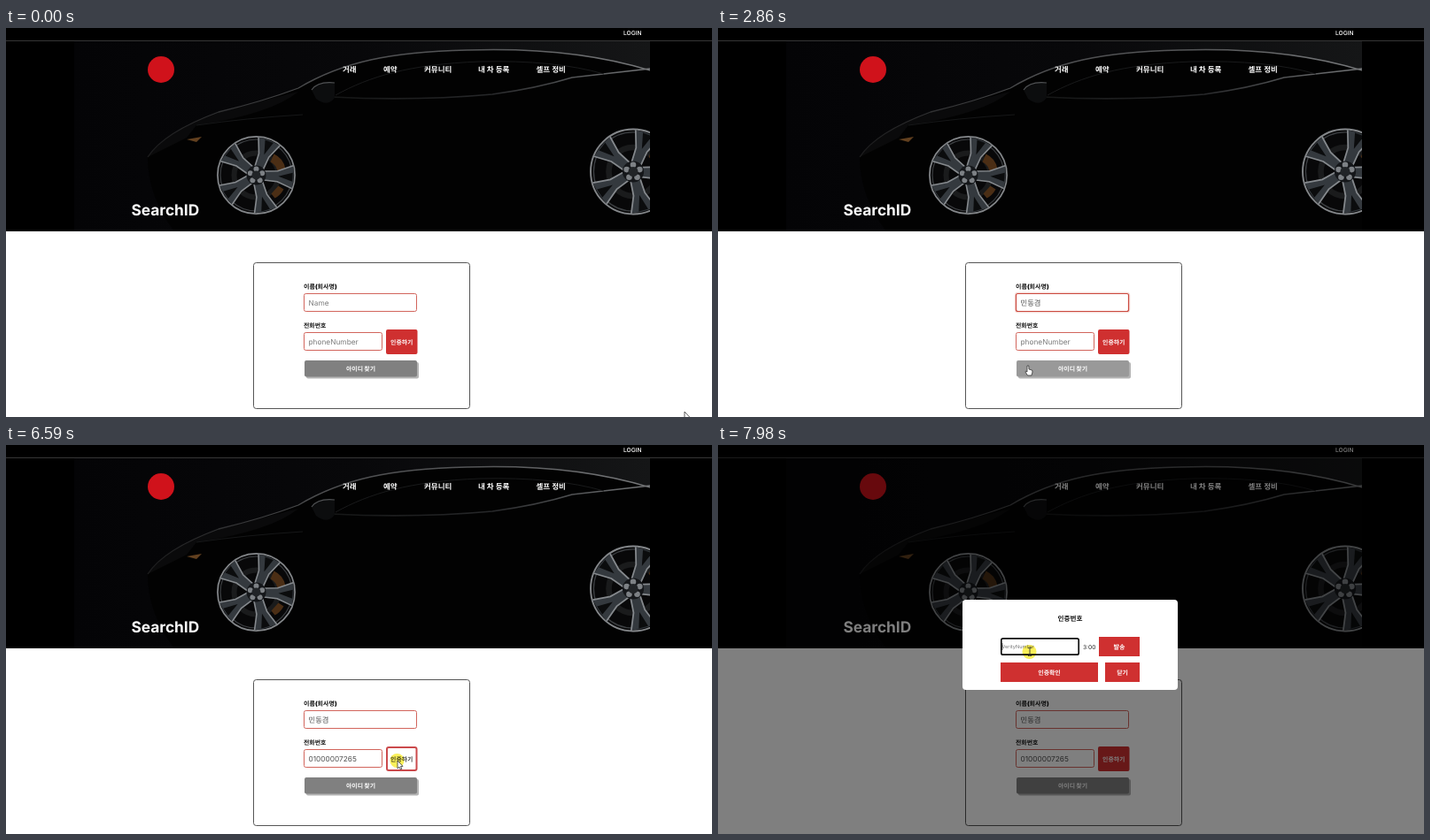
An HTML page with a canvas for the animation above (8000 ms loop, 797 by 440 pixels).

```html
<!DOCTYPE html>
<html lang="ko">
<head>
<meta charset="utf-8">
<title>SearchID</title>
<style>
html, body { margin: 0; width: 100%; height: 100%; overflow: hidden; background: #fff; }
canvas { display: block; }
</style>
</head>
<body>
<canvas id="stage" width="797" height="440"></canvas>
<script>
const ctx = document.getElementById('stage').getContext('2d');
const LOOP = 8000;
const FONT = 'Inter, "Noto Sans CJK KR", "Noto Sans CJK JP", "Noto Sans CJK", sans-serif';
const RED = '#cf3030';
const TAU = Math.PI * 2;
const BLINK = 530;

const box = {
  name: [336, 300, 128, 21],
  phone: [336, 344, 89, 21],
  verify: [429, 341, 35.5, 28],
  find: [337, 376, 127, 18.5],
  code: [319, 218, 89, 20],
  send: [430, 217, 46, 22],
  confirm: [319, 246, 110, 22],
  close: [437, 246, 39, 22]
};

// [time, x, y]
const path = [
  [0, 766, 434], [70, 766, 434], [560, 409, 313], [2460, 409, 313],
  [2660, 249, 430], [2850, 350, 382], [2920, 350, 382], [3130, 377, 354],
  [5850, 377, 354], [6350, 442, 357], [6850, 442, 357], [7220, 455, 227],
  [7390, 455, 227], [7580, 439, 245], [7850, 352, 234], [LOOP, 352, 234]
];

// [time, text]
const nameKeys = [
  [790, 'ㅁ'], [860, '미'], [1460, '민'], [1540, '민ㄷ'], [1640, '민도'],
  [1790, '민동'], [1930, '민동ㄱ'], [2000, '민동겨'], [2060, '민동겸']
];
const PHONE = '01000007265';
const phoneKeys = [3850, 3990, 4050, 4250, 4320, 4460, 4580, 4850, 4940, 5030, 5120]
  .map((t, i) => [t, PHONE.slice(0, i + 1)]);

const focusTimes = { name: [630, 3190], phone: [3190, 6520], code: [7920, LOOP] };
const MODAL_AT = 6650;
const clicks = [[6520, 6650], [7890, LOOP]];

const smooth = p => p * p * (3 - 2 * p);
const during = (t, [a, b]) => t >= a && t < b;
const inside = (p, [x, y, w, h]) => p.x >= x && p.x <= x + w && p.y >= y && p.y <= y + h;
const lastKey = (keys, t) => keys.filter(k => k[0] <= t).pop();

function pointerAt(t) {
  const i = Math.max(1, path.findIndex(k => k[0] > t));
  const [t0, x0, y0] = path[i - 1], [t1, x1, y1] = path[i];
  const p = smooth((t - t0) / (t1 - t0));
  return { x: x0 + (x1 - x0) * p, y: y0 + (y1 - y0) * p };
}

function text(str, x, y, size, color, weight = 400, align = 'left') {
  ctx.font = `${weight} ${size}px ${FONT}`;
  ctx.textAlign = align;
  ctx.fillStyle = color;
  ctx.fillText(str, x, y);
}

function rect([x, y, w, h], r, fill, stroke, line = 1) {
  ctx.beginPath();
  ctx.roundRect(x, y, w, h, r);
  if (fill) { ctx.fillStyle = fill; ctx.fill(); }
  if (stroke) { ctx.strokeStyle = stroke; ctx.lineWidth = line; ctx.stroke(); }
}

const inset = ([x, y, w, h], d) => [x + d, y + d, w - 2 * d, h - 2 * d];

function disc(x, y, r, fill) {
  ctx.beginPath();
  ctx.arc(x, y, r, 0, TAU);
  ctx.fillStyle = fill;
  ctx.fill();
}

function ring(x, y, r, color, width) {
  ctx.beginPath();
  ctx.arc(x, y, r, 0, TAU);
  ctx.strokeStyle = color;
  ctx.lineWidth = width;
  ctx.stroke();
}

function poly(points, fill, stroke, width = 1) {
  ctx.beginPath();
  points.forEach(([x, y]) => ctx.lineTo(x, y));
  ctx.closePath();
  if (fill) { ctx.fillStyle = fill; ctx.fill(); }
  if (stroke) { ctx.strokeStyle = stroke; ctx.lineWidth = width; ctx.stroke(); }
}

function line(d, color, width) {
  ctx.strokeStyle = color;
  ctx.lineWidth = width;
  ctx.stroke(new Path2D(d));
}

function shape(d, fill) {
  ctx.fillStyle = fill;
  ctx.fill(new Path2D(d));
}

function ramp(x0, y0, x1, y1, ...colors) {
  const g = ctx.createLinearGradient(x0, y0, x1, y1);
  colors.forEach((c, i) => g.addColorStop(i / (colors.length - 1), c));
  return g;
}

function wheel(x, y, r) {
  ctx.save();
  ctx.translate(x, y);
  ctx.scale(r / 45, r / 45);
  disc(0, 0, 45, '#080809');
  ring(0, 0, 43.6, '#84878a', 1.7);
  ring(0, 0, 40.5, '#3c3f42', 1.2);
  ring(0, 0, 25, '#1a1b1c', 6);
  shape('M20 -24 Q31 -19 33 -7 L24 -5 Q22 -12 16 -15Z M25 12 L31 16 Q27 23 21 26 L17 21Z', '#4b2e15');
  for (let i = 0; i < 5; i++) {
    ctx.save();
    ctx.rotate((-141 + 72 * i) * Math.PI / 180);
    poly([[9, -5], [24, -6], [41, -13], [42, -4], [42, 4], [41, 13], [24, 6], [9, 5]], '#34393e');
    line('M9 -5 L24 -6 L41 -13 M9 5 L24 6 L41 13', '#85898d', 1.6);
    poly([[25, 0], [41, -5], [41, 5]], '#0b0c0d');
    ctx.restore();
  }
  disc(0, 0, 11, '#15171a');
  for (let i = 0; i < 5; i++) {
    const a = i / 5 * TAU - Math.PI / 2;
    disc(7 * Math.cos(a), 7 * Math.sin(a), 3, '#7d8185');
  }
  disc(0, 0, 5, '#212427');
  ctx.restore();
}

function car() {
  const roof = 'M160 146 Q178 118 240 95 Q290 83 330 68 C380 38 435 27 520 25 Q640 21 727 48';
  ctx.save();
  ctx.beginPath();
  ctx.rect(77, 15, 650, 215);
  ctx.clip();
  ctx.fillStyle = ramp(77, 0, 727, 0, '#040406', '#08080a', '#151617');
  ctx.fillRect(77, 15, 650, 215);
  shape(roof + ' V230 H190 Q160 190 160 146Z', '#020202');
  shape('M160 146 Q178 118 240 95 L330 72 Q300 97 215 110 L204 124Z', '#0a0a0b');
  line(roof, ramp(160, 0, 727, 0, '#1c1c1d', '#4c4d4f', '#555658', '#77797b'), 1.3);
  line('M368 78 Q460 83 549 75 Q600 68 639 56 L727 46', ramp(368, 0, 727, 0, '#151616', '#27282a', '#77797b'), 1.6);
  line('M372 76 C410 55 455 41 535 38 Q620 36 675 52', '#191a1b', 1);
  line('M215 110 Q270 102 335 98', '#161718', 1);
  shape('M345 70 Q352 60 371 62 L371 79 Q363 90 350 80Z', '#0c0d0e');
  line('M345 70 Q352 60 371 62', '#515355', 1.2);
  shape('M204 126 L221 123 L215 129Z', '#62401f');
  wheel(282.5, 166.5, 45);
  wheel(708, 162.5, 49.5);
  ctx.restore();
}

function header() {
  ctx.fillStyle = '#000';
  ctx.fillRect(0, 0, 797, 230);
  car();
  ctx.fillStyle = '#353535';
  ctx.fillRect(0, 14, 797, 1);
  text('LOGIN', 697, 8, 6.7, '#fff', 500);
  disc(175, 47, 15, '#d0121b');
  [['거래', 380], ['예약', 426], ['커뮤니티', 472], ['내 차 등록', 533], ['셀프 정비', 598.5]]
    .forEach(([label, x]) => text(label, x, 50, 8.5, '#fff', 700));
  text('SearchID', 141.5, 212, 17.3, '#fff', 700);
}

function field(b, focused) {
  if (focused) rect(inset(b, -0.3), 3, null, '#f5d9d5', 2);
  rect(inset(b, 0.5), 2, '#fff', focused ? '#cb4a40' : '#d2655c', focused ? 1.2 : 1);
}

function caret(x, y, h, t, since) {
  if (Math.floor((t - since) / BLINK) % 2) return;
  ctx.fillStyle = '#222';
  ctx.fillRect(x, y, 0.8, h);
}

function input(id, keys, hint, y, t) {
  const focused = during(t, focusTimes[id]);
  const key = lastKey(keys, t);
  field(box[id], focused);
  text(key ? key[1] : hint, 341.5, y, 8.3, key ? '#505050' : '#7c7c7c');
  if (!focused) return;
  const x = key ? 341.5 + ctx.measureText(key[1]).width : 341.2;
  caret(x, y - 8, 10, t, Math.max(focusTimes[id][0], key ? key[0] : 0));
}

function button(b, label, size, hover, r = 0) {
  if (hover) rect(inset(b, 1), r, '#fff', '#cb4a4c', 2);
  else rect(b, r, RED);
  text(label, b[0] + b[2] / 2, b[1] + b[3] / 2 + 2.5, size, hover ? '#444' : '#fff', 900, 'center');
}

function form(t, pointer) {
  const open = t >= MODAL_AT;
  rect([279.5, 265.5, 244, 165], 3, '#fff', '#555');
  text('이름(회사명)', 336, 295.3, 7, '#111', 900);
  input('name', nameKeys, 'Name', 313.7, t);
  text('전화번호', 336, 339.3, 6.9, '#111', 900);
  input('phone', phoneKeys, 'phoneNumber', 357.7, t);
  button(box.verify, '인증하기', 6.9, !open && inside(pointer, box.verify), 2);
  const [x, y, w, h] = box.find;
  rect([x + 2, y + 2, w, h], 2, '#b4b4b4');
  rect(box.find, 2, !open && inside(pointer, box.find) ? '#999' : '#808080');
  text('아이디 찾기', 400.5, 387.8, 6.9, '#fff', 900, 'center');
}

function modal(t, pointer) {
  ctx.fillStyle = 'rgba(0,0,0,.5)';
  ctx.fillRect(0, 0, 797, 440);
  rect([276, 175, 243, 102], 4, '#fff');
  text('인증번호', 397.5, 199, 7.6, '#111', 700, 'center');
  const focused = during(t, focusTimes.code);
  if (focused) rect(inset(box.code, 0.8), 2, '#fff', '#111', 1.7);
  else rect(inset(box.code, 0.5), 0, '#fff', '#ead3d6');
  text('VerityNumber', 320.5, 230, 5.6, '#757575');
  if (focused) caret(320.5, 224, 8, t, focusTimes.code[0]);
  text('3:00', 412, 230.8, 6.6, '#222');
  button(box.send, '발송', 7, inside(pointer, box.send));
  button(box.confirm, '인증확인', 6.9, false);
  button(box.close, '닫기', 6.9, false);
}

const arrow = [[0, 0], [0, 9], [2, 7.2], [3.4, 10], [4.8, 9.3], [3.5, 6.6], [6, 6.4]];
const hand = [[-1, 0], [0.8, 0], [1, 4], [4.6, 5], [5, 7], [4, 11], [-0.5, 11], [-3, 7], [-2.4, 6], [-1, 7]];

function cursor(t, pointer) {
  const open = t >= MODAL_AT;
  ctx.save();
  ctx.translate(pointer.x, pointer.y);
  if (clicks.some(c => during(t, c))) {
    ctx.globalCompositeOperation = 'multiply';
    disc(-0.5, 0, 8, '#faf05a');
    ctx.globalCompositeOperation = 'source-over';
  }
  const fields = open ? [box.code] : [box.name, box.phone];
  if (fields.some(b => inside(pointer, b))) {
    line('M-2 -4.5 H-.7 L0 -4 L.7 -4.5 H2 M0 -4 V4 M-2 4.5 H-.7 L0 4 L.7 4.5 H2', '#333', 0.9);
  } else {
    const onFind = !open && inside(pointer, box.find);
    poly(onFind ? hand : arrow, '#fff', '#333', 0.8);
  }
  ctx.restore();
}

function draw(t) {
  const pointer = pointerAt(t);
  ctx.fillStyle = '#fff';
  ctx.fillRect(0, 0, 797, 440);
  header();
  form(t, pointer);
  if (t >= MODAL_AT) modal(t, pointer);
  cursor(t, pointer);
}

ctx.textRendering = 'geometricPrecision';
const start = performance.now();
function tick() {
  draw((performance.now() - start) % LOOP);
  requestAnimationFrame(tick);
}
tick();
</script>
</body>
</html>
```
